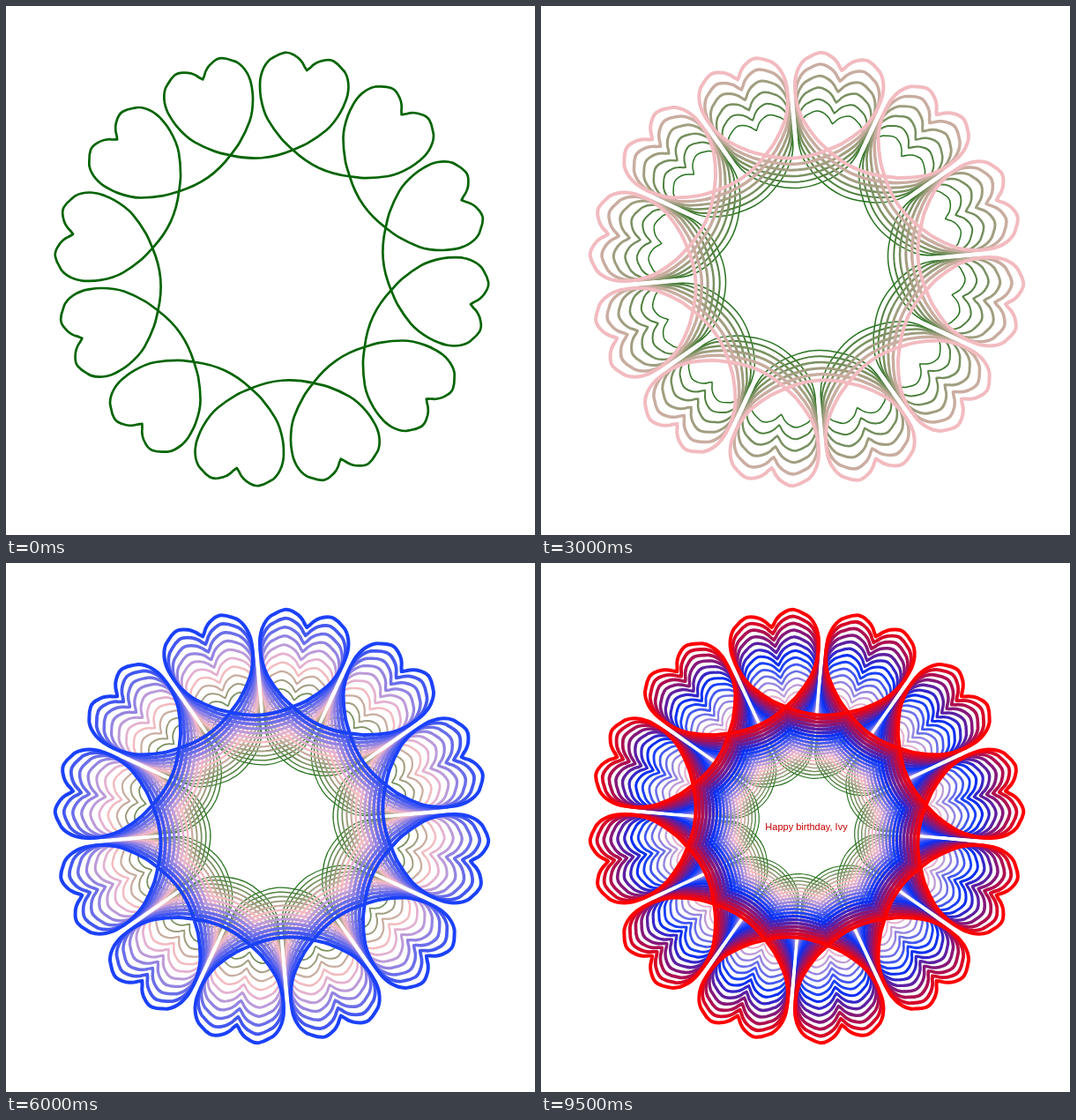
These frames come from a looping animation (600x600 px, 10 s). An HTML page with a canvas:

```html
<!DOCTYPE html>
<html lang="en">
<head>
<meta charset="utf-8">
<title>Heart wreath</title>
<style>
  html, body { margin: 0; width: 100%; height: 100%; overflow: hidden; background: #fff; }
  #stage { position: relative; width: 600px; height: 600px; overflow: hidden; }
  canvas { display: block; }
  #text {
    position: absolute; left: 0; top: 293px; width: 602px; text-align: center;
    font: 11px/13px "Liberation Sans", Arial, sans-serif; color: #c80000; white-space: pre;
  }
</style>
</head>
<body>
<div id="stage">
  <canvas id="art" width="600" height="600"></canvas>
  <div id="text"></div>
</div>
<script>
  const ctx = document.getElementById('art').getContext('2d');
  const text = document.getElementById('text');
  const STEPS = 20, STEP_MS = 500, GROWTH = 0.0737;
  const CX = 301.5, CY = 298.5, RAD = Math.PI / 180;
  const WORDS = ['Happy', ' birthday', ', Ivy'];
  const STOPS = [[0, 100, 0], [255, 192, 203], [0, 50, 255], [255, 0, 0]];

  // Right half of one heart: sideways offset, distance from centre, heading in degrees
  const HALF = [
    [-32.8, 122.4, 15], [0, 137.4, 33], [15.1, 147.7, 40], [33.4, 165.8, 50],
    [46, 189.2, 70], [49.1, 201, 80], [50.3, 210, 90], [49.8, 218.5, 100],
    [43.2, 234, 130], [38.5, 238, 139], [28.3, 244.4, 160], [18, 243.8, 200],
    [10, 239.8, 220], [4.5, 234.3, 240], [0, 228.9, 230]
  ];
  const mirrored = HALF.map(([x, y, a]) => [-x, y, -a]).reverse();

  function addCurve(path, nodes) {
    for (let i = 1; i < nodes.length; i++) {
      const [x0, y0, a0] = nodes[i - 1], [x1, y1, a1] = nodes[i];
      const h = Math.hypot(x1 - x0, y1 - y0) * 0.345;
      path.bezierCurveTo(
        x0 + h * Math.cos(a0 * RAD), -y0 - h * Math.sin(a0 * RAD),
        x1 - h * Math.cos(a1 * RAD), -y1 + h * Math.sin(a1 * RAD),
        x1, -y1);
    }
  }

  const heart = new Path2D();
  heart.moveTo(HALF[0][0], -HALF[0][1]);
  addCurve(heart, HALF);
  addCurve(heart, mirrored);

  const wreath = new Path2D();
  for (let i = 0; i < 12; i++) wreath.addPath(heart, new DOMMatrix().rotate(i * 30));

  function color(j) {
    const t = j / (STEPS - 1) * 3, i = Math.min(2, Math.floor(t)), f = t - i;
    const mix = STOPS[i].map((c, n) => Math.round(c + (STOPS[i + 1][n] - c) * f));
    return `rgb(${mix})`;
  }

  const radius = j => 1 + GROWTH * (j - 1);

  function draw(step) {
    ctx.setTransform(1, 0, 0, 1, 0, 0);
    ctx.fillStyle = '#fff';
    ctx.fillRect(0, 0, 600, 600);
    ctx.lineJoin = 'round';
    const widest = Math.min(4, 2.7 + 0.35 * step);
    for (let j = Math.min(1, step); j <= step; j++) {
      const scale = radius(j) / radius(step);
      const width = step ? 1 + (widest - 1) * j / step : widest;
      ctx.setTransform(scale, 0, 0, scale, CX, CY);
      ctx.rotate((step + 1) * 10 * RAD);
      ctx.lineWidth = width / scale;
      ctx.strokeStyle = color(j);
      ctx.stroke(wreath);
    }
    text.textContent = WORDS.slice(0, Math.max(0, step - 14)).join('');
  }

  let start, shown = -1;
  function tick(now) {
    if (start === undefined) start = now;
    const step = Math.floor(Math.max(0, now - start) / STEP_MS) % STEPS;
    if (step !== shown) draw(shown = step);
    requestAnimationFrame(tick);
  }
  draw(shown = 0);
  requestAnimationFrame(tick);
</script>
</body>
</html>
```
